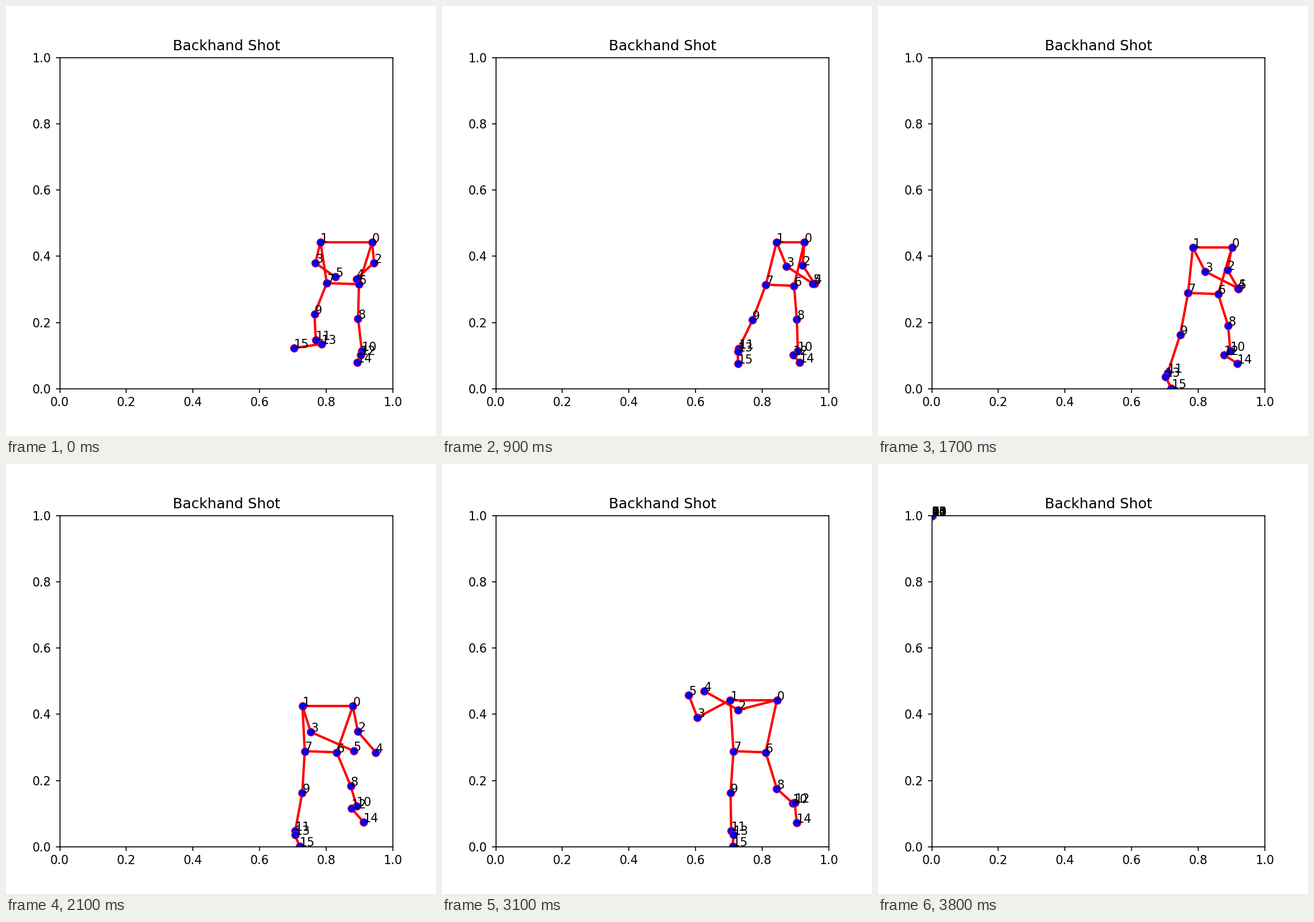
Recreate the animation shown at these times as a matplotlib script. Size 748 by 748 pixels, loop 6100 ms.

```python
import numpy as np
import matplotlib.pyplot as plt
from matplotlib.animation import FuncAnimation

INCHES, DPI = 5, 149.6
SIZE = INCHES * DPI
STEP_MS, FRAMES = 100, 61
GONE = 38  # from here on the tracker reports no body

# Even joints are the right side of the body, odd ones the left.
BONES = [(0, 1), (0, 6), (1, 7), (6, 7)]
BONES += [(n, n + 2) for n in (0, 1, 2, 3, 6, 7, 8, 9, 10, 11, 12, 13)]

# Steps at which the stroke changes: ready, reach, turn, open, swing, finish.
BEATS = np.array([0, 6, 13, 21, 27, 31])


def ease(k, start, end):
    t = np.clip((k - start) / (end - start), 0, 1)
    return t * t * (3 - 2 * t)


def bump(k, centre, width):
    return np.exp(-((k - centre) / width) ** 2)


def curve(k, v):
    """Smooth curve through one value per beat, without overshoot."""
    gap = np.diff(BEATS)
    slope = np.diff(v) / gap
    a, b = slope[:-1], slope[1:]
    same = a * b > 0
    inner = np.where(same, 2 * a * b / np.where(same, a + b, 1), 0)
    tan = np.concatenate([slope[:1], inner, slope[-1:] / 4])
    late = k - BEATS[-1]
    if late >= 0:  # the follow-through dies out
        return v[-1] + 2 * tan[-1] * (1 - np.exp(-late / 2))
    i = np.searchsorted(BEATS, k, side="right") - 1
    t = (k - BEATS[i]) / gap[i]
    bend = (1 - t) * tan[i] - t * tan[i + 1]
    return (v[i] + (v[i + 1] - v[i]) * t * t * (3 - 2 * t)
            + t * (1 - t) * gap[i] * bend)


def glide(k, *points):
    p = np.array(points, dtype=complex)
    return curve(k, p.real) + 1j * curve(k, p.imag)


def body(k):
    """The 16 joints as x + y*1j in stage pixels, y pointing down."""
    turn = bump(k, 12, 5)

    # trunk: two level bars that narrow as the body turns sideways
    chest = glide(k, 592, 607.5, 601.5, 559.5, 549, 542)
    chest += 1j * (410.5 + 12 * bump(k, 19.5, 5))
    half = 45 - 30 * turn - 5 * ease(k, 23, 33)
    shoulder_r, shoulder_l = chest + half, chest - half

    pelvis = glide(k, 586, 589.5, 582.5, 547.5, 538.5, 535)
    pelvis += 1j * (483 + 17.5 * ease(k, 6, 18))
    half = 28 - 5 * turn + 1j
    hip_r, hip_l = pelvis + half, pelvis - half

    # arms: the hands lead, the elbows hang off the middle
    hand_r = glide(k, 609.5 + 474.5j, 673 + 485j, 609.5 + 480j,
                   643 + 501.5j, 474.5 + 429j, 456 + 395j)
    hand_l = glide(k, 573 + 471.5j, 647 + 482.5j, 639 + 483.5j,
                   604.5 + 499j, 451 + 433.5j, 429.5 + 401.5j)
    hand_l -= 8 * bump(k, 29, 1.2)
    elbow_r = ((shoulder_r + hand_r) / 2 + glide(k, 17, -8, -14, -11, 11, -4)
               + 1j * (4 + 21 * ease(k, 21, 27)))
    elbow_l = ((shoulder_l + hand_l) / 2 + glide(k, -22, -20, -7, -30, -5, -21)
               + 1j * (6 + 29 * ease(k, 21, 31)))

    # right leg: planted, the heel lifts during the swing
    ankle_r = (619 - 9 * ease(k, 10, 21)
               + 1j * (600 - 10 * ease(k, 16, 26)))
    knee_r = ((hip_r + ankle_r) / 2
              - 4 + 11 * (ease(k, 0, 18) - ease(k, 21, 27))
              + 1j * (2 + 17 * ease(k, 12, 28)))
    heel_r = (ankle_r - 2 - 9 * ease(k, 2, 13) + 12 * ease(k, 19, 27)
              + 12 * ease(k, 28, 38) + 1j * (7 - 8 * ease(k, 17, 27)))
    toe_r = (ankle_r - 8 + 20 * ease(k, 0, 17) - 5 * ease(k, 21, 30)
             + 1j * (20 + 14 * ease(k, 14, 27)))

    # left leg: steps forward and down, the foot swings round
    ankle_l = (503 + 36 * bump(k, 0, 9)
               + 1j * (581 + 57 * ease(k, 5, 17)))
    knee_l = ((hip_l + ankle_l) / 2
              - 12 + 16 * ease(k, 0, 13) - 7 * ease(k, 21, 27)
              + 1j * (3 + 8 * bump(k, 5, 4)))
    heel_l = (ankle_l + 10 - 15 * ease(k, 0, 13) + 9 * ease(k, 14, 28)
              + 1j * (7 - 5 * bump(k, 6, 3)))
    toe_l = (ankle_l + 9 - 47 * np.exp(-k / 6) - 6 * ease(k, 20, 30)
             + 1j * (27 - 13 * np.exp(-k / 3)))

    return np.array([shoulder_r, shoulder_l, elbow_r, elbow_l, hand_r, hand_l,
                     hip_r, hip_l, knee_r, knee_l, ankle_r, ankle_l,
                     heel_r, heel_l, toe_r, toe_l])


def pose(k):
    """Joint positions in data units of the axes."""
    if k >= GONE:
        return np.zeros(16), np.ones(16)
    p = body(k) / SIZE
    return (p.real - 0.125) / 0.775, (0.89 - p.imag) / 0.77


fig, ax = plt.subplots(figsize=(INCHES, INCHES), dpi=DPI)
fig.subplots_adjust(left=0.125, right=0.9, bottom=0.11, top=0.88)
ax.set(xlim=(0, 1), ylim=(0, 1))
ax.set_title("Backhand Shot")

bones = [ax.plot([], [], "r-", lw=2)[0] for _ in BONES]
joints, = ax.plot([], [], "o", ms=6.5, mfc="blue", mec="red", mew=0.5)
labels = [ax.text(0, 0, str(n)) for n in range(16)]


def update(k):
    x, y = pose(k)
    for line, (a, b) in zip(bones, BONES):
        line.set_data([x[a], x[b]], [y[a], y[b]])
    joints.set_data(x, y)
    for label, spot in zip(labels, zip(x, y)):
        label.set_position(spot)
    return [*bones, joints, *labels]


anim = FuncAnimation(fig, update, frames=FRAMES, interval=STEP_MS,
                     init_func=lambda: update(0), repeat=True, repeat_delay=0)
plt.show()
```
